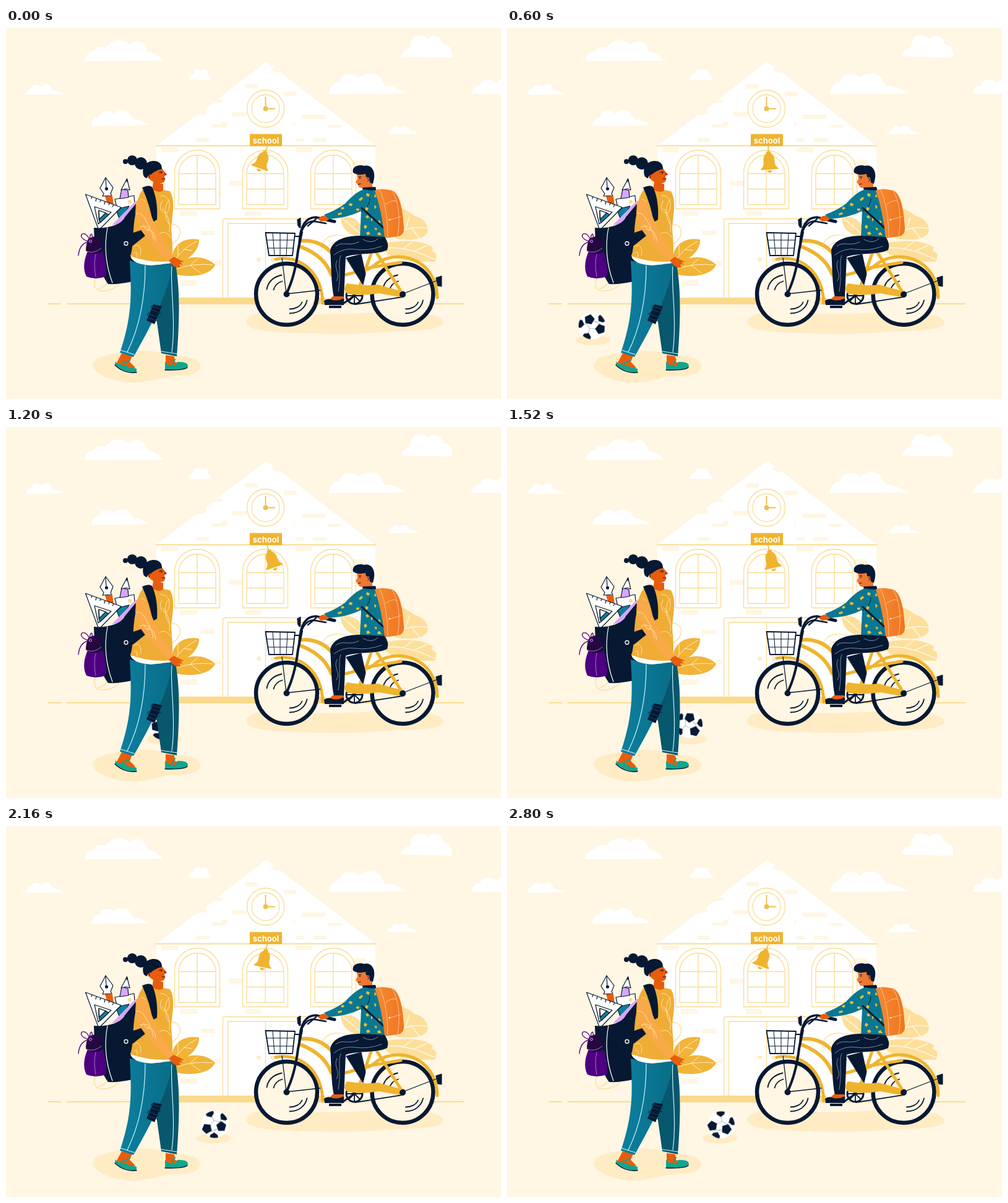
Write an HTML page that moves like this. It is 800 px wide and 600 px high and loops after 2.84 s.

```html
<!DOCTYPE html>
<html lang="en">
<head>
<meta charset="utf-8">
<title>Back to school</title>
<style>
html, body { margin: 0; width: 100%; height: 100%; overflow: hidden; background: #fff6e3; }
svg { display: block; width: 100%; height: 100%; }
.line { fill: none; stroke-linecap: round; stroke-linejoin: round; }
.pale { stroke: #fbdc92; }
.gold { stroke: #efb42e; }
.navy { stroke: #071833; }
.white { stroke: #fff; }
.roll { animation: roll 2840ms infinite; }
.spin { animation: spin 2840ms infinite; }
.bell { animation: swing 2840ms ease-in-out infinite; }
/* power ease-out in two halves */
@keyframes roll {
  0% { transform: translateX(-45px); animation-timing-function: cubic-bezier(.333, .532, .667, .836); }
  50% { transform: translateX(284px); animation-timing-function: cubic-bezier(.333, .9, .667, 1); }
  100% { transform: translateX(344px); }
}
@keyframes spin {
  0% { transform: rotate(-960.5deg); animation-timing-function: cubic-bezier(.333, .532, .667, .836); }
  50% { transform: rotate(-137.8deg); animation-timing-function: cubic-bezier(.333, .9, .667, 1); }
  100% { transform: rotate(12deg); }
}
@keyframes swing {
  0%, 93%, 100% { transform: rotate(19.5deg); }
  38% { transform: rotate(-19.5deg); }
}
</style>
</head>
<body>
<svg viewBox="0 0 800 600">
<defs>
  <path id="cloud" d="M0 34C0 24 6 19 15 18C18 10 27 9 34 12C40 2 48 0 56 0C64 0 69 3 72 7C79 -1 94 -1 98 9C101 13 102 16 102 19C112 19 121 25 126 33Z"/>
  <path id="puff" d="M0 34C0 22 8 15 17 14C18 3 30 0 38 2Q45 3 49 8C54 0 64 0 70 0Q83 2 86 14Q90 17 89 20Q108 20 126 33Z"/>
  <g id="window" class="line pale" stroke-width="1.3">
    <path d="M-36.5 292.500V234a36.500 36.500 0 0 1 73 0V292.500Z"/>
    <path d="M-30 285.500V236a30 30.500 0 0 1 60 0V285.500ZM0 206V285M-30 235.500H30M-30 260.500H30"/>
  </g>
  <g id="wheel" class="line navy">
    <circle r="49.500" stroke-width="6.500" fill="#fff6e3"/>
    <path stroke-width="1.800" d="M-32 -8C-30 -20 -21 -28 -8 -31M-21 -7C-19 -15 -14 -19 -7 -21M33 10C30 23 19 31 5 31M25 13C22 20 14 24 5 24"/>
    <circle r="5" fill="#071833" stroke="none"/>
  </g>
  <path id="patch" d="M-7 -23L-6 -17L0 -13L6 -17L7 -23Z"/>
  <path id="penta" d="M0 -8.500L8 -2.600L5 7H-5L-8 -2.600Z"/>
  <clipPath id="disc"><circle r="22"/></clipPath>
  <linearGradient id="cloth"><stop stop-color="#0d7f9f"/><stop offset="1" stop-color="#096d88"/></linearGradient>
  <linearGradient id="sack"><stop stop-color="#f58a32"/><stop offset="1" stop-color="#ef7522"/></linearGradient>
</defs>

<rect width="800" height="600" fill="#fff6e3"/>
<g fill="#fff">
  <use href="#cloud" x="127" y="20"/>
  <use href="#puff" x="522" y="73"/>
  <use href="#puff" transform="translate(33 91) scale(.48 .5)"/>
  <use href="#puff" transform="translate(138 133) scale(.75 .74)"/>
  <use href="#puff" transform="translate(753 82) scale(.8 .73)"/>
  <use href="#puff" transform="translate(617 158) scale(.4 .41)"/>
  <path d="M638 46C640 38 646 33 653 32C654 19 658 11 667 12C674 11 680 14 682 18C687 10 704 10 707 26C717 27 722 34 721 48Z"/>
  <path d="M296 84C295 78 298 75 303 74C304 66 311 64 315 69C320 64 327 68 326 74Q331 78 332 84Z"/>
</g>

<!-- schoolhouse -->
<path fill="#fff" d="M420 55L432 63L429 68L436 72H444L597 190V437H243V190L308 141L324 139L323 130L336 121H350V116L342 116L352 107Z"/>
<g fill="#fff6e3">
  <path d="M386 91h21v7h-21ZM449 103h20v7h-20ZM365 136h24v7h-24ZM478 140h38v7h-38ZM349 152h9v6h-9ZM332 156h23v5h-23ZM465 152h2v6h-2ZM520 157h22v4h-22ZM308 178h20v6h-20ZM468 178h13v6h-13ZM496 178h22v6h-22Z"/>
  <path d="M251 193h27v8h-27ZM360 247h22v8h-22ZM468 193h27v8h-27ZM560 214h22v8h-22ZM386 296h26v8h-26ZM281 296h28v8h-28ZM315 328h22v7h-22ZM282 408h27v9h-27ZM337 376h10v8h-10ZM346 262h2v8h-2Z"/>
</g>
<path class="line pale" stroke-width="2" d="M243 190.500H597M68 446H88M99 446H740"/>
<path fill="#fbd98a" d="M280 436H516V446H280Z"/>
<g class="line pale" stroke-width="1.300">
  <circle cx="419.500" cy="130.500" r="30"/><circle cx="419.500" cy="130.500" r="22.500"/>
  <path d="M350.500 436V312Q350.500 308.500 354 308.500H490M358.500 436V316H482M419.500 316V436"/>
  <circle cx="408.500" cy="374.500" r="2.300"/><circle cx="431" cy="374.500" r="2.300"/>
</g>
<path class="line" stroke="#efc04d" stroke-width="1.800" d="M419.500 112V130.500H434"/>
<circle cx="419.500" cy="130.500" r="4" fill="#efc04d"/>
<use href="#window" x="309"/><use href="#window" x="419"/><use href="#window" x="529"/>
<g transform="translate(422 192)"><g class="bell">
  <path class="line gold" stroke-width="1.500" d="M0 -2V9"/>
  <path fill="#efb42e" d="M-4 11A4 4 0 1 1 4 11C9 14 9 19 9 25C9 30 11 33 14 35L14 37H-14L-14 35C-11 33 -9 30 -9 25C-9 19 -9 14 -4 11ZM-4 38.500H4Q3 42 0 42T-4 38.500Z"/>
</g></g>
<rect x="394" y="171.500" width="52" height="19.500" fill="#efb42e"/>
<text x="420" y="187" text-anchor="middle" fill="#fff" font-family="Inter, sans-serif" font-weight="700" font-size="13">school</text>

<!-- ground shadows -->
<g fill="#ffecc5">
  <path d="M388 476C388 464 412 457 452 460C510 466 560 462 612 459C660 457 706 463 707 476C706 490 660 489 620 491C570 496 520 495 470 493C420 492 390 488 388 476Z"/>
  <path d="M140 546C142 531 165 529 188 524C220 519 247 523 270 529C300 531 316 538 314 548C309 565 282 562 260 564C237 569 219 575 194 573C171 570 142 560 140 546Z"/>
</g>

<!-- ball -->
<g class="roll">
  <ellipse cy="505" rx="28.500" ry="8" fill="#ffecc5"/>
  <g transform="translate(0 483)"><g class="spin"><g transform="translate(2 0)">
    <circle r="22" fill="#fff"/>
    <g clip-path="url(#disc)" fill="#071833">
      <path class="line" stroke="#9aa3b3" stroke-width=".8" d="M-3 -13L0 -6L-7 0M0 -6L9 -3M13 -9L10 -4M-9 11L0 8L4 8M-4 14L0 8"/>
      <use href="#penta" transform="translate(10 5) rotate(8)"/>
      <use href="#penta" transform="translate(-13.500 4.500) rotate(-20)"/>
      <use href="#patch" transform="rotate(-14)"/>
      <use href="#patch" transform="rotate(60)"/>
      <use href="#patch" transform="rotate(193)"/>
    </g>
  </g></g></g>
</g>

<!-- plants -->
<path class="line pale" stroke-width="1.200" d="M263 318C276 315 283 324 281 334C278 345 268 350 262 352M145 404C141 414 143 424 152 425C165 427 180 420 185 411M150 422C160 418 166 411 168 404M511 360C508 344 521 334 538 335L552 337M514 360C520 348 535 344 550 344"/>
<g fill="#fddf9b">
  <path d="M541 306C556 304 568 308 574 320V337C557 337 541 326 541 306Z"/>
  <path d="M626 323C632 299 649 301 661 304C676 308 684 320 681 331C674 344 646 344 628 340Z"/>
  <path d="M610 348C640 343 671 342 690 355L688 360L695 365Q696 371 693 378C669 378 633 380 612 361Z"/>
  <path d="M622 294Q638 285 660 304L640 312Z"/>
</g>
<path class="line" stroke="#fff6e3" stroke-width="1.500" d="M544 308L572 332M630 334Q650 319 681 324M645 326L652 306M655 323L668 340M613 356Q647 352 692 374M643 356L657 346M659 361L680 352"/>
<g fill="#f1b437">
  <path d="M268 385C264 355 283 337 312 342C313 357 299 374 276 381Z"/>
  <path d="M272 384C289 368 320 365 338 383C329 402 295 404 272 398Z"/>
</g>
<path class="line" stroke="#fff0cf" stroke-width="1" d="M272 378Q281 359 308 345M278 367L278 352M287 358L300 360M277 389Q303 380 334 383M297 384L310 373M298 384L314 396"/>

<!-- satchel contents -->
<g class="line navy" stroke-width="1.200">
  <path fill="#fff" d="M176 277L207 271L209 300L183 307Z"/>
  <path fill="#d7a6fa" d="M187 260L197 263L198 274L184 276Z"/>
  <path fill="#fff" d="M195.500 244L200 262L194 260L186 262Z"/>
  <path fill="#071833" d="M195.500 244L196.500 248H194Z"/>
  <path fill="#e85d0c" stroke="none" d="M160 272H172L174 287L164 286Z"/>
  <path fill="#fff" d="M161 242L173 258L169 268L171 271L156 272L158 268L152 259Z"/>
  <path d="M161 242L162 259"/><circle cx="162.500" cy="260" r="2" fill="#071833"/>
  <path fill="#fff" d="M128.500 269L186 290L150 327ZM143 289L149 317L170 298Z" fill-rule="evenodd"/>
  <path d="M139 273L138 276M146 276L145 280M153 278L152 281M160 281L159 285M167 283L166 286M174 286L172 289"/>
  <path fill="#0e7f9c" d="M150 295L161 299L166 302L152 315L150 309Z"/>
  <path fill="#fff" d="M150 295L161 299L151 309Z"/>
  <path fill="#0e7f9c" d="M179 297L186 291L199 288L185 313Z"/>
</g>
<circle cx="200" cy="281" r="3" fill="#fbd98a"/>

<!-- satchel -->
<path fill="#d7a6fa" d="M171 319L210 279L207 312Z"/>
<path fill="#071833" d="M142 323C159 325 186 320 192 306Q201 295 211 283L216 345L204 410Q182 415 165 414C151 395 143 362 142 323Z"/>
<path class="line white" stroke-width="1.200" d="M164 323C158 354 162 385 172 412"/>
<path fill="#4d0080" d="M132 361C146 366 151 365 156 361C160 375 164 390 161 402Q145 408 130 402C123 388 127 373 132 361Z"/>
<path fill="#25083f" d="M133 341Q146 333 153 342Q157 356 149 364Q137 368 129 360Q129 350 133 341Z"/>
<path class="line" stroke="#4d0080" stroke-width="1.300" d="M136 345C124 344 119 337 123 333C129 331 134 338 136 345C134 335 139 330 139 335Q141 342 136 345C123 347 118 356 117 368"/>
<path class="line" stroke="#c48bea" stroke-width=".8" d="M130 361Q142 366 154 356M145 366Q141 381 145 402"/>
<circle cx="136.500" cy="345" r="2" fill="none" stroke="#d7a6fa"/>

<!-- girl: legs and shoes -->
<g fill="#e85d0c">
  <path d="M187 526L204 530L200 540L209 549Q198 556 178 543Z"/>
  <path d="M258 529L272 531L273 540L287 546L258 549Z"/>
</g>
<path fill="#11a68f" d="M177 539C181 548 195 541 199 550Q206 549 211 551V557C199 559 180 550 176 544ZM257 540Q266 549 274 546L277 540Q293 539 294 546Q294 552 276 553H257Z"/>
<path class="line navy" stroke-width="1.500" d="M176 545C185 554 198 559 211 557M257 553Q287 554 293 549"/>
<path class="line" stroke="#11a68f" stroke-width="2" d="M187 543L199 538M268 546L273 536"/>
<path fill="#07576d" d="M252 381L274 382C282 425 280 480 276 531L251 526L242 462Z"/>
<path fill="url(#cloth)" d="M200 376Q236 388 270 379C263 425 241 470 206 532L184 525C204 466 203 430 200 376Z"/>
<path fill="#071833" d="M238 447L252 450L240 479L227 473Z"/>
<path class="line" stroke="#0b7591" stroke-width=".8" stroke-dasharray="1.500 2" d="M238 451L249 454M235 456L247 460M232 463L244 467M230 469L241 473"/>
<path class="line navy" stroke-width="1" d="M236 449L234 452M231 460L228 464M245 474L242 473M250 462L247 461"/>
<path class="line" stroke="#c9f3fb" stroke-width="1.200" d="M225 384C225 433 216 483 196 524M185 521L207 528M268 386C265 420 275 470 268 524M251 523L277 527"/>
<path fill="#fff" d="M201 367Q202 382 235 384L268 380L266 374Z"/>

<!-- girl: head -->
<g fill="#071833"><circle cx="193" cy="216" r="4"/><circle cx="204" cy="214" r="8"/><circle cx="218" cy="219" r="10"/></g>
<path fill="#e85d0c" d="M227 232L250 224L255 231L260 237L256 239L257 246Q256 251 248 251L254 252V263Q244 271 236 262L238 249Q228 244 227 232Z"/>
<path fill="#071833" d="M222 238C218 220 233 212 245 216Q252 219 252 228Q242 230 234 237Q229 237 228 243Q223 242 222 238Z"/>
<path class="line navy" stroke-width="1" d="M247 234Q250 231 253 233M252 244L257 244M229 237Q233 237 231 243"/>
<circle cx="251" cy="234.500" r="1" fill="#071833"/><path fill="#b21e35" d="M256 234L260 237L256 239ZM253 243L257 243L255 245Z"/>

<!-- girl: sweater and arm -->
<path fill="#efad35" d="M226 257Q238 264 238 262Q249 268 255 262L265 264C274 279 269 301 267 323C268 345 271 357 267 377Q236 381 201 369C207 350 204 327 209 302C211 284 213 267 226 257Z"/>
<path fill="#071833" d="M220 258Q231 253 236 257Q246 279 244 310L237 314Q233 287 220 258ZM197 334L221 326L230 332L205 352L199 347Z"/>
<path class="line" stroke="#ffe4a3" stroke-width="1" d="M250 271C266 270 267 291 260 299C250 302 246 286 253 280M264 278C254 285 256 310 265 319M214 281Q220 273 225 281M208 353C215 347 220 358 217 367M244 335Q258 324 266 339M207 364Q213 359 212 370M253 292Q267 307 264 330"/>
<path fill="#f9a947" d="M210 281C219 272 227 281 231 295C239 313 245 332 272 371L263 378C245 358 211 328 209 303Z"/>
<path class="line" stroke="#ffe4a3" stroke-width="1" d="M211 300C222 296 225 313 233 322Q229 333 222 319M228 327Q240 324 242 344M217 322Q235 315 238 341"/>
<path fill="#e85d0c" d="M263 376L271 370L283 376L288 378L282 379L286 383L280 382L282 387Q273 389 268 382Z"/>
<circle cx="194" cy="348.500" r="3" fill="#071833" stroke="#fff" stroke-width="1.300"/>

<!-- bicycle -->
<use href="#wheel" x="453.500" y="430.500"/><use href="#wheel" x="641" y="430.500"/>
<g class="line gold">
  <path stroke-width="5" d="M436 374C475 366 510 394 512 445M592 386C629 353 696 372 697 436"/>
  <path stroke-width="6" d="M478 344C500 343 517 352 528 366M477 354C507 366 519 382 526 399"/>
  <path stroke-width="5" d="M598 362L641 430M590 365L571 419M549 399L588 389M580 389L638 379"/>
</g>
<g class="line navy">
  <path fill="#071833" stroke-width="1" d="M550 372L574 366L581 398L577 415Z"/>
  <circle cx="563" cy="433" r="13" stroke-width="3"/>
  <path stroke-width="1.800" d="M563 421V445M551 433H575M555 425L571 441M571 425L555 441M564 447L641 435"/>
  <path stroke-width="3" d="M563 433L543 447"/>
  <path stroke-width="1.300" d="M641 430L698 408M453 430L508 424M453 430L446 372"/>
  <path stroke-width="4" d="M453 430Q467 402 472 360L478 330"/>
  <path stroke-width="3.500" d="M474 348C475 327 481 306 501 306L514 309"/>
  <path stroke-width="5" d="M518 310L531 313"/>
  <path stroke-width="2.500" d="M474 310V322M477 331Q485 310 500 313L517 316M488 320L501 309"/>
  <path fill="#071833" stroke-width="1" d="M471 310L476 307V323L472 320ZM695 404L704 401V418L698 417Z"/>
</g>
<path fill="#efb42e" d="M551 413Q580 418 601 415L641 426Q650 431 642 436L603 429Q575 434 552 430Q543 423 551 413Z"/>
<circle cx="641" cy="431" r="5" fill="#071833"/>
<g class="line navy">
  <path stroke-width="1.800" d="M419.500 331L467 332L463 368H425Z"/>
  <path stroke-width="1" d="M431 332L434 368M443 332V368M455 332L453 368M421 343H466M423 356H464"/>
  <path stroke-width="2" d="M467 337H477"/>
</g>

<!-- rider -->
<path fill="#ef7731" d="M567 236L588 234L592 250V261L582 264L579 258Q570 260 569 254L565 249L568 244Z"/>
<path fill="#071833" d="M561 234C558 224 570 220 579 223C590 220 597 231 595 243L593 252L588 250L587 242L582 241L581 236Q568 239 561 234Z"/>
<path class="line navy" stroke-width="1" d="M570 241Q572 239 574 241M569 253L573 252M584 243Q588 243 585 248"/>
<circle cx="572" cy="243" r=".9" fill="#071833"/>
<path fill="#071833" d="M576 258L597 257L599 264L577 264Z"/>
<path fill="#e85d0c" d="M520 303L510 304L504 309L509 313L518 312L524 308Z"/>
<path fill="#0b7891" d="M579 261Q593 264 604 261L614 339H572L574 296Q552 307 522 309L514 302Q535 294 548 284Q566 264 579 261Z"/>
<path class="line navy" stroke-width="1" d="M574 297Q588 289 588 276"/>
<path fill="#eebc35" d="M570 277l5 -4l2 3l-5 4ZM555 283l5 1l-1 4l-5 -1ZM541 291l4 -2l2 3l-4 2ZM583 267l5 2l-2 4l-4 -2ZM596 268l3 5l-4 1ZM566 292l5 0l-1 4l-4 -1ZM582 289l4 3l-3 4l-3 -3ZM595 286l4 3l-3 4ZM581 304l4 -1l2 4l-4 1ZM590 306l4 3l-4 4ZM602 310l4 4l-4 3ZM580 318l4 3l-3 4l-3 -3ZM595 323l5 1l-2 4ZM582 331l4 -2l3 4l-5 2ZM600 332l4 -2l3 5l-6 0ZM536 300l6 -2l1 3l-6 2Z"/>
<path class="line navy" stroke-width="3" d="M575 291L611 324"/>
<path fill="url(#sack)" d="M596 263Q605 258 625 263C637 270 641 292 643 323Q644 335 633 337L612 340C609 312 604 285 596 263Z"/>
<path class="line" stroke="#ffc18a" stroke-width="1" d="M604 262C614 284 617 312 617 338M624 263C636 283 637 311 633 336M618 311L638 305M614 285Q626 276 632 281"/>
<circle cx="620" cy="310" r="1.200" fill="#fff6e3"/>
<path fill="#071833" d="M573 336L612 338Q620 349 616 359C601 367 570 363 549 370L546 436H530C525 411 526 385 524 360C528 341 552 336 573 336Z"/>
<path class="line" stroke="#aebccd" stroke-width=".7" d="M533 353C543 344 555 354 570 346M530 367Q545 355 565 358T607 353M535 376C528 389 542 397 534 409M541 368C536 381 542 395 537 426M577 342Q591 350 601 341"/>
<path fill="#e85d0c" d="M528 434H545L547 441H521Z"/>
<path fill="#071833" d="M514 441Q520 436 528 440Q537 442 546 437V448H515ZM522 449H542V453H522Z"/>
</svg>
</body>
</html>
```
